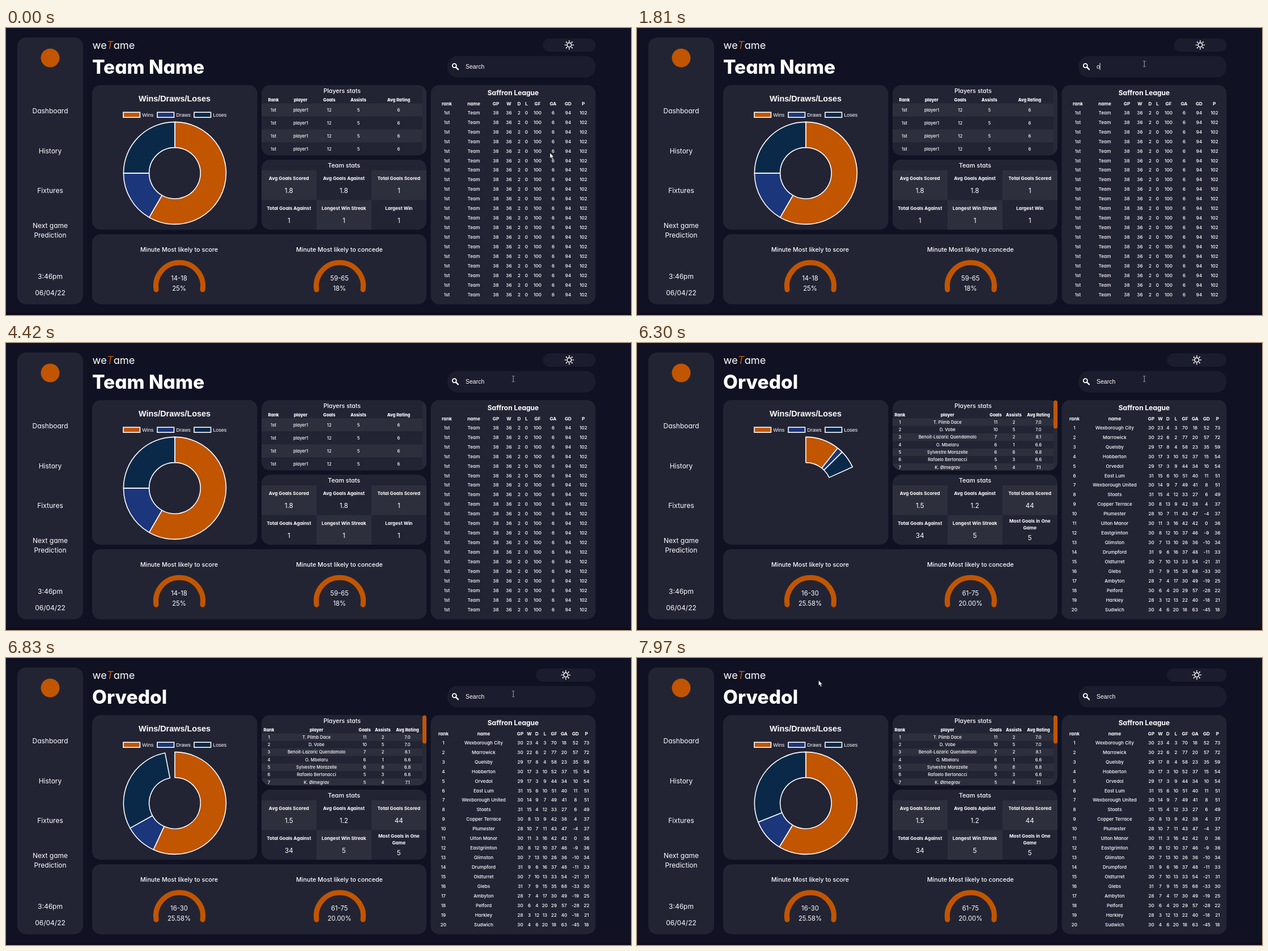
Recreate the animation shown at these times as an HTML page. Size 1103 px wide and 508 px high, loop 8000 ms.

```html
<!DOCTYPE html>
<html lang="en">
<head>
<meta charset="utf-8">
<title>Team dashboard</title>
<style>
  html, body { margin: 0; width: 100%; height: 100%; overflow: hidden; background: #101122; }
  svg { display: block; width: 1103px; height: 508px; }
  text {
    font-family: Inter, "Open Sans", sans-serif; font-feature-settings: "cv11"; font-optical-sizing: none;
    fill: #fff; text-anchor: middle;
  }
  .left { text-anchor: start; }
  .arial { font-family: "Liberation Sans", Arial, sans-serif; }
  .panel { fill: #222434; }
  .field { fill: #1b1c2d; }
  .track { fill: #282a38; }
  .light { fill: #2d2f3d; }
  .accent { fill: #c15500; }
  .line { fill: none; stroke: #fff; }
  .gauge { fill: none; stroke: #c15500; stroke-width: 9; stroke-linecap: round; }
</style>
</head>
<body>
<svg id="stage" viewBox="0 0 1103 508"></svg>
<script>
const LOOP = 8000, LOADED = 6300, STEP = 200 / 3;
const CHART_START = 6251, CHART_TIME = 1000;
const SLICES = ['#c15500', '#1b367b', '#0a2949'];

// y is the middle of the capitals
const text = (x, y, str, size, weight = 400, cls = '') =>
  `<text x="${x}" y="${(y + size * .355).toFixed(2)}" font-size="${size}" font-weight="${weight}" class="${cls}">${str}</text>`;
const rect = (x, y, w, h, cls, r = 0) =>
  `<rect x="${x}" y="${y}" width="${w}" height="${h}" rx="${r}" class="${cls}"/>`;
const row = (y, columns, cells, size, weight) =>
  columns.map((x, i) => text(x, y, cells[i], size, weight)).join('');
const times = (n, make) => Array.from({ length: n }, (_, i) => make(i)).join('');

function sun(x) {
  const rays = times(8, i => `<path d="M0 -6.3V-7.5" transform="rotate(${i * 45})"/>`);
  return `<g class="line" stroke-width="1.7" stroke-linecap="round" transform="translate(${x} 30)"><circle r="3.8"/>${rays}</g>`;
}

function gauge(x, title) {
  return text(x, 392, title, 10.7, 500) +
    `<path class="gauge" d="M${x - 40.5} 463.2A41.5 41.5 0 1 1 ${x + 41.5} 463.2"/>`;
}

function frame() {
  const menu = [[147, 'Dashboard'], [217.5, 'History'], [288, 'Fixtures'], [350, 'Next game'],
    [367, 'Prediction'], [440, '3:46pm'], [468.5, '06/04/22']];
  const legend = [[207, 'Wins'], [267, 'Draws'], [332, 'Loses']];
  return '<rect y="504" width="1103" height="4" fill="#120b1b"/>' +
    rect(20, 17, 116, 472, 'panel', 15) +
    rect(152, 101, 291.5, 256, 'panel', 15) +
    rect(451, 101, 291, 124.5, 'panel', 15) +
    rect(451, 233, 291, 124, 'panel', 15) +
    rect(749.5, 101, 291, 388, 'panel', 15) +
    rect(152, 365, 590, 124, 'panel', 15) +
    rect(779, 49.5, 261.5, 38, 'field', 18) +
    '<circle cx="78" cy="53" r="16.5" class="accent"/>' +
    menu.map(([y, s]) => text(78, y, s, 12)).join('') +
    text(152.5, 30.5, 'we<tspan font-style="italic" fill="#c15500">T</tspan>ame', 18.3, 400, 'left') +
    text(297.5, 125, 'Wins/Draws/Loses', 14.4, 700, 'arial') +
    legend.map(([x, s], i) =>
      `<rect x="${x}" y="149.2" width="29.5" height="9" fill="${SLICES[i]}" stroke="#fff" stroke-width="1.6"/>` +
      text(x + 33.2, 153.5, s, 9, 400, 'arial left')).join('') +
    text(593, 111.5, 'Players stats', 10.6, 500) +
    text(596.5, 243, 'Team stats', 10.8, 500) +
    text(895, 114.5, 'Saffron League', 12, 700) +
    gauge(305.5, 'Minute Most likely to score') +
    gauge(588.5, 'Minute Most likely to concede') +
    '<g class="line"><circle cx="791.3" cy="66.6" r="3.5" stroke-width="1.9"/>' +
    '<path d="M794 69.4L798 73.4" stroke-width="2.3" stroke-linecap="round"/></g>';
}

function players(columns, rows, top, pitch) {
  const head = ['Rank', 'player', 'Goals', 'Assists', 'Avg Rating'];
  return '<g clip-path="url(#players)">' +
    rows.map((cells, i) => (i % 2 ? '' : rect(451, top + i * pitch, 284, pitch, 'light')) +
      row(top + (i + .5) * pitch, columns, cells, 7.6, 500)).join('') +
    rect(735, 101, 7, 125, 'track') + '</g>' + row(127, columns, head, 7.5, 800);
}

function teamStats(values, last) {
  const labels = ['Avg Goals Scored', 'Avg Goals Against', 'Total Goals Scored',
    'Total Goals Against', 'Longest Win Streak', last];
  return '<g clip-path="url(#team)">' + labels.map((label, i) => {
    const col = i % 3, line = Math.floor(i / 3), x = 499.3 + col * 97, lines = label.split('|');
    const split = lines.length > 1;
    return (i % 2 ? '' : rect(451 + col * 97, 252 + line * 52.5, 97, 52.5, 'light')) +
      lines.map((s, k) => text(x, 266.5 + line * 52.5 + (split ? k * 12 - 4 : 0), s, 8.2, 700)).join('') +
      text(x, 288 + line * 52.5 + (split ? 4 : 0), values[i], 11.6, 400);
  }).join('') + '</g>';
}

function league(columns, rows) {
  return row(134.5, columns, ['rank', 'name', 'GP', 'W', 'D', 'L', 'GF', 'GA', 'GD', 'P'], 8.2, 700) +
    rows.map((cells, i) => row(149.8 + i * 16.96, columns, cells, 8.2, 500)).join('');
}

function page(id, name, buttonX, minutes, body) {
  return `<g id="${id}">` + text(152, 69, name, 33.5, 800, 'left') +
    rect(buttonX, 18.5, 1040.5 - buttonX, 23.5, 'field', 11.7) + sun((buttonX + 1040.5) / 2) +
    minutes.map((s, i) => text(i < 2 ? 305.5 : 588.5, i % 2 ? 461 : 443, s, 11.3)).join('') +
    body + '</g>';
}

const emptyPage = page('empty', 'Team Name', 947.5, ['14-18', '25%', '59-65', '18%'],
  players([472, 520, 570.5, 622, 693], Array(4).fill(['1st', 'player1', 12, 5, 6]), 133.5, 23) +
  teamStats(['1.8', '1.8', 1, 1, 1, 1], 'Largest Win') +
  league([778, 825.5, 864.5, 887.5, 905.5, 918.5, 938, 965.5, 992, 1019],
    Array(20).fill(['1st', 'Team', 38, 36, 2, 0, 100, 6, 94, 102])));

const scorers = `T. Plimb Dace,11,2,7.0
D. Vobe,10,5,7.0
Benoit-Lazaric Quendamolo,7,2,8.1
O. Mbelaru,6,1,6.6
Sylvestre Morazelle,6,8,6.8
Rafaelo Bertonacci,5,3,6.6
K. Ølmegrav,5,4,7.1`.split('\n').map((line, i) => [i + 1, ...line.split(',')]);

// name, won, drawn, lost, goals for, goals against
const standings = `Wexborough City,23,4,3,70,18
Marrowick,22,6,2,77,20
Quelsby,17,8,4,58,23
Hobberton,17,3,10,52,37
Orvedol,17,3,9,44,34
East Lum,15,6,10,51,40
Wexborough United,14,9,7,49,41
Stoats,15,4,12,33,27
Copper Terrace,8,13,9,42,38
Plumester,10,7,11,43,47
Ulton Manor,11,3,16,42,42
Eastgrimton,8,12,10,37,46
Glimston,7,13,10,26,36
Drumpford,9,6,16,37,48
Oldturret,7,10,13,33,54
Glebs,7,9,15,35,68
Ambyton,7,4,17,30,49
Pelford,6,4,20,29,57
Harkley,3,12,13,22,40
Sudwich,4,6,20,18,63`.split('\n').map((line, i) => {
  const [name, ...rest] = line.split(','), [w, d, l, gf, ga] = rest.map(Number);
  return [i + 1, name, w + d + l, w, d, l, gf, ga, gf - ga, 3 * w + d];
});

const loadedPage = page('loaded', 'Orvedol', 935.3, ['16-30', '25.58%', '61-75', '20.00%'],
  players([464, 548, 633, 665, 708.5], scorers, 133.5, 13.3) +
  rect(735, 101.5, 7, 50, 'accent', 3.5) +
  teamStats(['1.5', '1.2', 44, 34, 5, 5], 'Most Goals in One|Game') +
  league([772, 843, 907.5, 923.5, 937, 951, 967, 985, 1005, 1024.5], standings));

const stage = document.getElementById('stage');
stage.innerHTML = `<defs>
    <clipPath id="players">${rect(451, 101, 291, 124.5, '', 15)}</clipPath>
    <clipPath id="team">${rect(451, 233, 291, 124, '', 15)}</clipPath>
  </defs>` + frame() + emptyPage + loadedPage +
  '<g id="donut" stroke="#fff" stroke-width="1.6" stroke-linejoin="round">' +
  SLICES.map(color => `<path fill="${color}"/>`).join('') + '</g>' +
  text(811, 68, 'Search', 10.5, 400, 'arial left').replace('<text', '<text id="query"') +
  '<rect id="caret" y="62" width="1" height="12" fill="#fff"/>' +
  '<circle id="click" cx="894" cy="63" r="9" fill="#ff0" fill-opacity=".47"/>' +
  '<path id="arrow" d="M0 0V9.6L2.2 7.6L3.8 11.4L5.5 10.6L3.9 7H6.7Z" fill="#fff" stroke="#111" stroke-width=".5"/>' +
  '<path id="beam" d="M-2 -5H-.6L0 -4.5L.6 -5H2M0 -4.5V4.5M-2 5H-.6L0 4.5L.6 5H2" fill="none" stroke="#b9bac2" stroke-width=".9"/>';

const $ = id => document.getElementById(id);
const show = (id, on) => { $(id).style.display = on ? '' : 'none'; };
const slices = [...$('donut').children];
const query = $('query'), caret = $('caret');

function slicePath(from, to) {
  const outer = 90.5, inner = 45.3, big = to - from > .5 ? 1 : 0;
  const at = (r, turn) => {
    const a = turn * 2 * Math.PI;
    return `${(297.9 + r * Math.sin(a)).toFixed(2)} ${(256.9 - r * Math.cos(a)).toFixed(2)}`;
  };
  return `M${at(outer, from)}A${outer} ${outer} 0 ${big} 1 ${at(outer, to)}` +
    `L${at(inner, to)}A${inner} ${inner} 0 ${big} 0 ${at(inner, from)}Z`;
}

function drawDonut(t) {
  const loaded = t >= LOADED, results = loaded ? [17, 3, 9] : [7, 2, 3];
  const total = results.reduce((a, b) => a + b);
  const p = Math.min(1, (t - CHART_START) / CHART_TIME);
  const sweep = loaded ? 1 - (1 - p) ** 4 : 1;
  let from = 0;
  results.forEach((n, i) => {
    const to = from + n / total * sweep;
    slices[i].setAttribute('d', slicePath(from, to));
    from = to;
  });
}

const KEYS = [1810, 2080, 2410, 2680, 2940, 3280, 3750];
function drawSearch(t) {
  const typed = t < 4420 ? KEYS.filter(k => t >= k).length : 0;
  const label = typed ? 'orvedol'.slice(0, typed) : 'Search';
  if (query.textContent !== label) query.textContent = label;
  const lit = (t >= 1000 && t < 1540) || (t >= KEYS[0] && t < 4290);
  show('caret', lit);
  if (lit) caret.setAttribute('x', 811 + (typed ? query.getComputedTextLength() - .3 : 0));
  show('click', t >= 1000 && t < 1200);
}

const PATH = [[0, 960, 221], [866, 895.3, 63.5], [7100, 895.3, 63.5], [7433, 426, 105],
  [7633, 426, 105], [7833, 258, 74], [7966, 320.5, 39.5]];
function drawPointer(t) {
  let i = 0;
  while (i < PATH.length - 2 && t >= PATH[i + 1][0]) i++;
  const [t0, x0, y0] = PATH[i], [t1, x1, y1] = PATH[i + 1];
  const p = Math.min(1, (t - t0) / (t1 - t0)), e = p * p * (3 - 2 * p);
  const x = x0 + (x1 - x0) * e, y = y0 + (y1 - y0) * e;
  const overText = y > 50 && y < 87 && (x > 805 || x < 430);
  show('arrow', !overText);
  show('beam', overText);
  $(overText ? 'beam' : 'arrow').setAttribute('transform', `translate(${x.toFixed(2)} ${y.toFixed(2)})`);
}

// motion advances in steps of 1/15 s
function snap(t) {
  const base = t < LOADED ? 0 : LOADED;
  return base + Math.floor((t - base + 4) / STEP) * STEP;
}

const start = performance.now();
function draw() {
  const t = (performance.now() - start) % LOOP, stepped = snap(t);
  show('empty', t < LOADED);
  show('loaded', t >= LOADED);
  drawDonut(t < LOADED ? 0 : stepped);
  drawSearch(t);
  drawPointer(stepped);
  requestAnimationFrame(draw);
}
draw();
</script>
</body>
</html>
```
